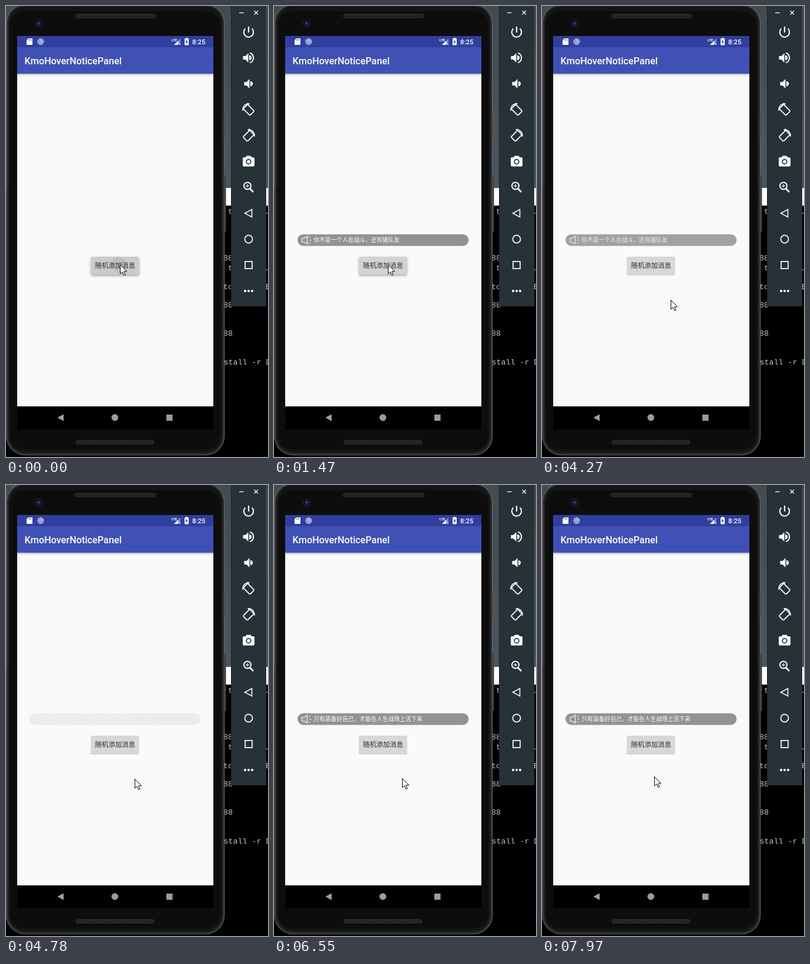
Animation, 446 px wide and 766 px high, one loop 8 s. Source, as an HTML page with a canvas:

```html
<!DOCTYPE html>
<html lang="zh-CN">
<head>
<meta charset="utf-8">
<title>Floating notice</title>
<style>
html, body { margin: 0; width: 100%; height: 100%; overflow: hidden; background: #000; }
canvas { display: block; width: 446px; height: 766px; }
</style>
</head>
<body>
<canvas id="stage" width="446" height="766"></canvas>
<script>
const W = 446, H = 766, LOOP = 8000;
const CJK = '"Noto Sans CJK SC", "Noto Sans CJK", "Noto Sans CJK JP", sans-serif';
const ROBOTO = 'Roboto, sans-serif';
const MONO = '"Liberation Mono", monospace';
const ctx = document.getElementById('stage').getContext('2d');
let g = ctx;

const clamp = v => Math.max(0, Math.min(1, v));

function rect(x, y, w, h, color) {
  g.fillStyle = color;
  g.fillRect(x, y, w, h);
}

function round(x, y, w, h, r, fill, line, lw = 1) {
  g.beginPath();
  g.roundRect(x, y, w, h, r);
  paint(fill, line, lw);
}

function paint(fill, line, lw = 1) {
  if (fill) { g.fillStyle = fill; g.fill(); }
  if (line) { g.strokeStyle = line; g.lineWidth = lw; g.stroke(); }
}

function poly(points, fill, line, lw) {
  g.beginPath();
  points.forEach(([x, y]) => g.lineTo(x, y));
  g.closePath();
  paint(fill, line, lw);
}

function arc(x, y, r, fill, line, lw, from = 0, to = Math.PI * 2) {
  g.beginPath();
  g.arc(x, y, r, from, to);
  paint(fill, line, lw);
}

function line(x1, y1, x2, y2, color, lw) {
  g.beginPath();
  g.moveTo(x1, y1);
  g.lineTo(x2, y2);
  paint(null, color, lw);
}

function text(str, x, y, font, color) {
  g.font = font;
  g.fillStyle = color;
  g.fillText(str, x, y);
}

function fade(y1, y2, c1, c2) {
  const grad = g.createLinearGradient(0, y1, 0, y2);
  grad.addColorStop(0, c1);
  grad.addColorStop(1, c2);
  return grad;
}

function drawDesktop() {
  rect(0, 0, W, H, '#000');
  rect(0, 0, W, 309, fade(0, 309, '#434b51', '#4a5660'));
  rect(371, 309, 75, 30, '#fff');
  const font = '13.33px ' + MONO, color = '#c4c4c4';
  [['t', 378, 353], ['.', 440, 353], ['88', 370, 432], ['t', 378, 449], ['.', 440, 449],
   ['tc', 370, 481], ['E', 442, 481], ['88', 370, 512], ['88', 370, 560], ['stall -r D', 370.5, 609]]
    .forEach(([s, x, y]) => text(s, x, y, font, color));
}

function grille(x, y, w, h) {
  round(x, y, w, h, 3, '#1d1d1d', '#363636');
  for (let i = x + 3; i < x + w - 2; i += 3) {
    rect(i, y + 1.5, 1, 1, '#444');
    rect(i + 1, y + 3.5, 1, 1, '#3a3a3a');
  }
}

function drawPhone() {
  round(370, 182, 4, 43, 1, '#393939', '#666');
  round(370, 287, 4, 96, 1, '#292929', '#555');
  round(1, -3, 370.5, 765.5, 32, '#202020', '#6a6a6a', 1.2);
  round(3.5, -1, 365.5, 760.5, 30, '#151515', '#3a3a3a');
  round(6, 8, 360, 746, 25, '#0d0d0d', '#191919');
  grille(118, 14, 137, 6);
  grille(119, 738, 133, 6);
  arc(56, 30, 6.5, '#11131c', '#20222b', 1);
  arc(56, 30, 3, '#202b66');
  arc(55, 29, 1.2, '#4555a5');
}

function drawStatus() {
  rect(19, 51, 334, 19, '#303f9f');
  poly([[38, 55], [45, 55], [45, 66], [35, 66], [35, 58]], '#fff');
  [38, 40, 42].forEach(x => rect(x, 56.5, 1, 2, '#303f9f'));
  arc(59, 60.5, 5.2, '#8f99cb', '#aeb6db', 1);
  arc(59.5, 59.5, 2.8, '#a5aed7');
  text('LTE', 281.5, 59.5, '700 6px ' + ROBOTO, '#fff');
  poly([[297, 55], [297, 66], [286, 66]], '#7f8ac4');
  poly([[293, 59], [293, 66], [286, 66]], '#fff');
  line(293.5, 62.5, 297, 66, '#fff', 1);
  round(304, 55, 7, 11.5, 1, '#fff');
  rect(306, 54, 3, 1.5, '#fff');
  poly([[308, 57], [305.5, 61.5], [307, 61.5], [307, 65], [309.5, 60], [308, 60]], '#303f9f');
  text('8:25', 317, 64.7, '500 11.4px ' + ROBOTO, '#fff');
}

function drawScreen() {
  rect(19, 115, 334, 565, '#fafafa');
  drawStatus();
  rect(19, 70, 334, 45, '#3f51b5');
  rect(19, 115, 334, 4, fade(115, 119, 'rgba(0,0,0,.24)', 'rgba(0,0,0,0)'));
  text('KmoHoverNoticePanel', 31.5, 99, '500 16.25px ' + ROBOTO, '#fff');
  rect(19, 680, 334, 39, '#000');
  poly([[87.5, 699], [98, 693.5], [98, 705]], '#a2a2a2');
  arc(185.3, 699, 5.8, '#9c9c9c');
  rect(273, 694, 10.5, 10.5, '#9c9c9c');
}

function speaker(x, y) {
  poly([[x, y - 3], [x + 4, y - 3], [x + 9, y - 8], [x + 9, y + 8], [x + 4, y + 3], [x, y + 3]], '#fff');
  g.beginPath();
  g.arc(x + 10.5, y, 4.2, -Math.PI / 2, Math.PI / 2);
  paint('#fff');
}

function rotateIcon(y, flip) {
  g.save();
  g.translate(413, y);
  g.scale(flip, 1);
  arc(0, 0, 10, null, '#fff', 1.6, Math.PI * 0.94, Math.PI * 1.52);
  poly([[-3, -11.5], [2, -10.5], [-1, -7]], '#fff');
  g.rotate(Math.PI / 4);
  round(-7.5, -5, 16, 10.5, 1.5, null, '#fff', 1.8);
  g.restore();
}

function drawToolbar() {
  const w = '#fff', x = 413;
  rect(384, 0, 59, 510, '#263238');
  rect(383, 0, 1, 510, '#1b2429');
  line(397, 11.5, 404.5, 11.5, w, 1.3);
  line(422.5, 8, 429, 14.5, w, 1.3);
  line(429, 8, 422.5, 14.5, w, 1.3);

  arc(x, 44.5, 8.2, null, w, 2.1, -Math.PI * 0.26, Math.PI * 1.26);
  line(x, 35, x, 45, w, 2.2);

  speaker(403.5, 88);
  arc(412.5, 88, 8.8, null, w, 2, -1.25, 1.25);
  speaker(405.5, 132);

  rotateIcon(176, 1);
  rotateIcon(220, -1);

  round(403, 257, 20, 15.5, 2, w);
  poly([[407, 258], [409.5, 254.5], [416.5, 254.5], [419, 258]], w);
  arc(x, 264.5, 4.7, '#263238');
  arc(x, 264.5, 3, w);

  arc(411, 305.5, 6, null, w, 2);
  line(415, 310, 421, 316, w, 2.6);
  line(408, 305.5, 414, 305.5, w, 1.2);
  line(411, 302.5, 411, 308.5, w, 1.2);

  poly([[406.5, 352], [418.5, 345.5], [418.5, 358.5]], null, w, 1.6);
  arc(x, 396, 6.6, null, w, 1.7);
  g.strokeStyle = w;
  g.lineWidth = 1.7;
  g.strokeRect(407, 434, 12, 12);
  [-6, 0, 6].forEach(d => arc(x + d, 484, 2.1, w));
}

// Press and release times of the taps on the button
const taps = [[-120, 40], [330, 440], [850, 950], [1080, 1190]];
const FADE = 390;

function tapLevel(t, [down, up]) {
  if (t < down || t > up + FADE) return 0;
  return t < up ? clamp((t - down) / 80) : 1 - (t - up) / FADE;
}

function drawButton(t) {
  const level = Math.max(...taps.map(tap => tapLevel(t, tap)));
  const lift = clamp(level * 3);
  g.save();
  g.shadowColor = `rgba(0,0,0,${0.32 + 0.06 * lift})`;
  g.shadowBlur = 2 + 3 * lift;
  g.shadowOffsetY = 0.8 + 1.2 * lift;
  round(145, 426, 81, 30, 1.6, '#d6d7d7');
  g.restore();

  g.save();
  g.beginPath();
  g.roundRect(145, 426, 81, 30, 1.6);
  g.clip();
  rect(145, 426, 81, 30, `rgba(0,0,0,${0.055 * level})`);
  taps.forEach(tap => {
    const k = tapLevel(t, tap);
    if (!k) return;
    const r = 0.11 * Math.min(t - tap[0], tap[1] - tap[0]) + 0.25 * Math.max(0, t - tap[1]);
    arc(192, 439.5, r, `rgba(0,0,0,${0.065 * k * k})`);
  });
  g.restore();
  text('随机添加消息', 151.6, 444.8, '11.38px ' + CJK, '#2c2c2c');
}

function drawNotice(str, alpha) {
  if (alpha <= 0) return;
  g.save();
  g.globalAlpha = alpha;
  round(40, 387.7, 291.3, 19.8, 9.9, '#929292');
  poly([[47.8, 394.5], [51.5, 394.5], [56.5, 391], [56.5, 404.3], [51.5, 401], [47.8, 401]], null, '#fff', 1.1);
  line(59, 394, 62, 391.8, '#fff', 1);
  line(60, 397.7, 63.5, 397.7, '#fff', 1);
  line(59, 401.3, 62, 403.5, '#fff', 1);
  text(str, 67.4, 401.3, '9.75px ' + CJK, '#fff');
  g.restore();
}

function drawNotices(t) {
  if (t >= 30 && t < 4540) {
    const out = t < 4270 ? 1 : clamp(1 - (t - 4222) / 318);
    drawNotice('你不是一个人在战斗，还有猪队友', Math.min(clamp(t / 380), out));
  }
  if (t >= 4780) drawNotice('只有装备好自己，才能在人生战场上活下来', clamp((t - 4730) / 380));
}

const path = [
  [0, 194, 439], [1710, 194, 439], [1735, 175, 462], [1765, 205, 498], [1790, 227, 512],
  [2230, 227, 512], [2290, 219, 499], [6540, 219, 499], [6550, 218, 498], [6960, 188, 510],
  [7360, 188, 510], [7450, 191, 503], [7540, 189, 497], [7950, 189, 497], [7970, 191, 495],
  [LOOP, 191, 495]
];

function drawCursor(t) {
  const i = path.findIndex(p => p[0] > t);
  const [t0, x0, y0] = path[i - 1], [t1, x1, y1] = path[i];
  const k = (t - t0) / (t1 - t0);
  g.save();
  g.translate(Math.round(x0 + (x1 - x0) * k) + 0.5, Math.round(y0 + (y1 - y0) * k) + 0.5);
  poly([[0, 0], [0, 15.5], [3.6, 12.2], [6.2, 18], [8.6, 17], [6.2, 11.4], [11, 11.2]], '#fff', '#000', 1);
  g.restore();
}

// The still parts are painted once
const still = document.createElement('canvas');
still.width = W;
still.height = H;
g = still.getContext('2d');
drawDesktop();
drawPhone();
drawScreen();
drawToolbar();
g = ctx;

function frame() {
  const t = performance.now() % LOOP;
  g.drawImage(still, 0, 0);
  drawNotices(t);
  drawButton(t);
  drawCursor(t);
  requestAnimationFrame(frame);
}
frame();
</script>
</body>
</html>
```
